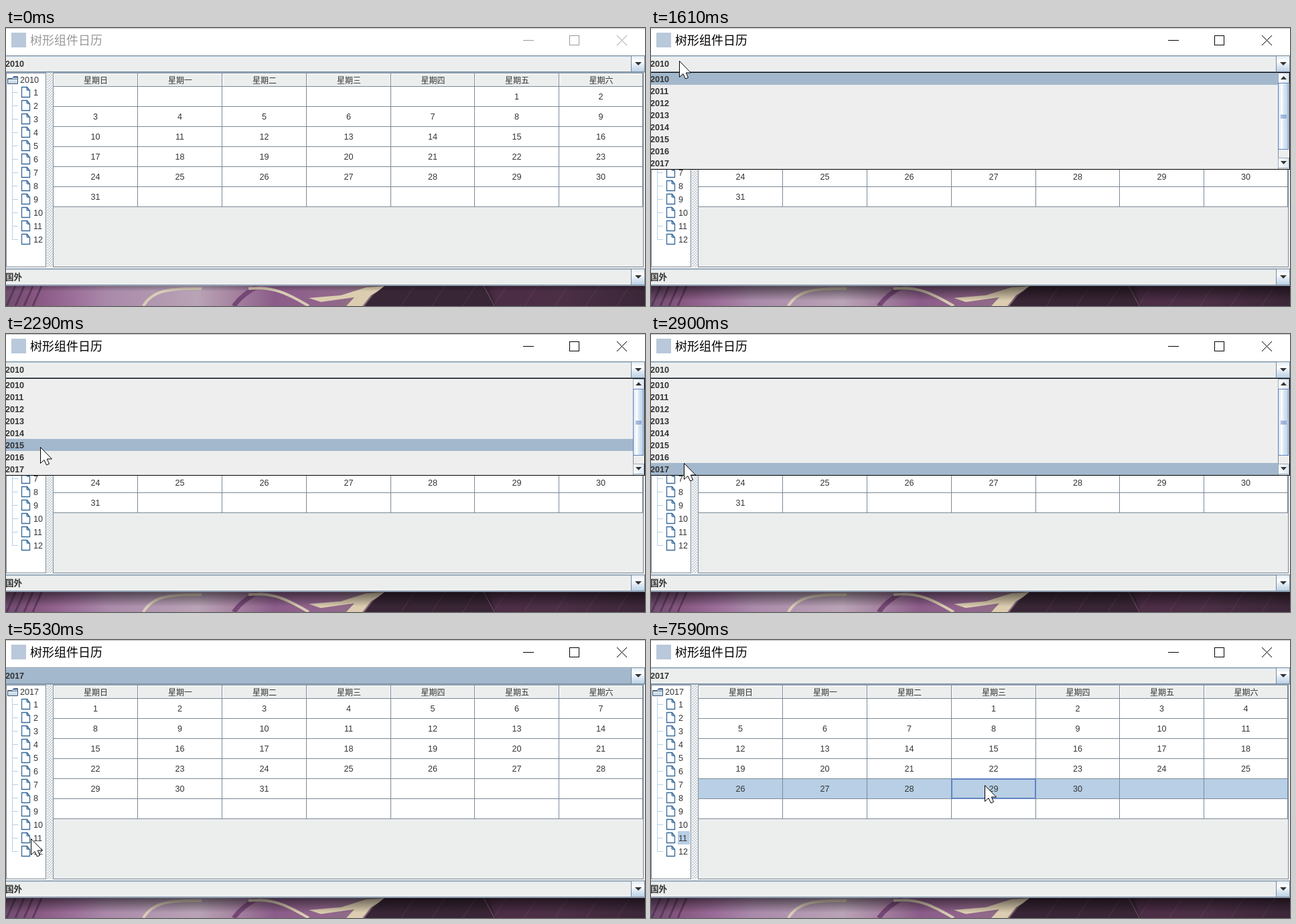
Recreate the animation shown at these times as an HTML page with a canvas. Size 954 by 416 pixels, loop 8000 ms.

```html
<!DOCTYPE html>
<html lang="zh">
<head>
<meta charset="utf-8">
<style>
html, body { margin: 0; width: 100%; height: 100%; overflow: hidden; background: #eceeee }
canvas { display: block }
</style>
</head>
<body>
<canvas width="954" height="416"></canvas>
<script>
const g = document.querySelector('canvas').getContext('2d');
const LOOP = 8000;
const EDGE = '#7a8a99', PALE = '#b8cfe5', BLUE = '#6382bf', FOCUS = '#a3b8cc', PANEL = '#eceeee', INK = '#333';
const FACE = '"Liberation Sans", "Noto Sans CJK SC", "Noto Sans CJK", sans-serif';
const PLAIN = '12.6px ' + FACE, BOLD = 'bold 12.6px ' + FACE;
const HAN = '12px "Noto Sans CJK SC", "Noto Sans CJK", sans-serif';
const COLS = [71, 197, 323, 449, 575, 700, 826, 951];

const linear = p => p, speedUp = p => p * p, slowDown = p => 1 - (1 - p) ** 2;
const smooth = p => p * p * (3 - 2 * p);

// Pointer moves: first step, last step, number of steps, target, easing
const MOVES = [
  [70, 70, 1, 678, 396, linear],
  [148, 850, 10, 44, 63, smooth],
  [900, 1130, 4, 42, 51, slowDown],
  [1300, 1300, 1, 42, 49, linear],
  [1820, 2290, 7, 51, 169, smooth],
  [2360, 2520, 3, 49, 191, slowDown],
  [2900, 3060, 3, 48, 198, linear],
  [4220, 4450, 4, 28, 119, smooth],
  [4530, 4610, 2, 24, 170, speedUp],
  [4680, 4990, 5, 37, 270, slowDown],
  [5080, 5530, 6, 37, 297, slowDown],
  [6220, 6900, 10, 309, 236, speedUp],
  [6980, 6980, 1, 361, 236, linear],
  [7050, 7440, 6, 498, 217, slowDown]
];

function pointerAt(t) {
  let x = 740, y = 430;
  for (const [from, to, n, tx, ty, ease] of MOVES) {
    if (t < from) break;
    const step = n > 1 ? Math.floor((t - from + 1) / (to - from) * (n - 1)) + 1 : 1;
    const p = ease(Math.min(step, n) / n);
    x += (tx - x) * p;
    y += (ty - y) * p;
  }
  return [Math.round(x), Math.round(y)];
}

function box(x, y, w, h, color) {
  g.fillStyle = color;
  g.fillRect(x, y, w, h);
}
function frame(x, y, w, h, color) {
  g.strokeStyle = color;
  g.lineWidth = 1;
  g.strokeRect(x + .5, y + .5, w - 1, h - 1);
}
function text(s, x, y, font = PLAIN, color = INK, align = 'left') {
  g.font = font;
  g.fillStyle = color;
  g.textAlign = align;
  g.fillText(s, x, y);
}
function shape(points, fill, stroke, width = 1) {
  g.beginPath();
  points.forEach(([x, y]) => g.lineTo(x, y));
  if (fill) { g.closePath(); g.fillStyle = fill; g.fill(); }
  if (stroke) { g.strokeStyle = stroke; g.lineWidth = width; g.stroke(); }
}
function ramp(x0, y0, x1, y1, ...stops) {
  const r = g.createLinearGradient(x0, y0, x1, y1);
  stops.forEach(([at, color]) => r.addColorStop(at, color));
  return r;
}
function curve(color, width, x, y, ...c) {
  g.beginPath();
  g.moveTo(x, y);
  g.bezierCurveTo(...c);
  g.strokeStyle = color;
  g.lineWidth = width;
  g.stroke();
}

function wallpaper(active) {
  box(0, 385, 954, 31, ramp(0, 0, 954, 0, [0, '#704d70'], [.04, '#85557f'], [.1, '#9a6c98'],
    [.16, '#aa8aaa'], [.3, '#b9a3b6'], [.36, '#a582a0'], [.42, '#8b5c89'], [.5, '#92668d'],
    [.56, '#8d6f83'], [.6, '#3d2939'], [.74, '#382434'], [.77, '#4c2d46'], [.87, '#4b2f45'], [1, '#3b2638']));
  for (let x = 4; x < 50; x += 13) curve('#43294699', 3, x + 10, 386, x + 6, 396, x + 3, 402, x - 3, 416);
  curve('#d9cdb8', 4, 205, 416, 218, 394, 240, 389, 292, 390);
  curve('#754775', 7, 340, 416, 352, 400, 362, 395, 376, 386);
  curve('#d8cbb2', 4, 362, 390, 398, 386, 420, 397, 452, 416);
  shape([[452, 404], [500, 400], [538, 388], [568, 386], [545, 400], [532, 416], [508, 416], [520, 403], [470, 410]], '#dccdb0');
  shape([[565, 386], [720, 386], [731, 416], [535, 416], [548, 400]], '#382535');
  for (let x = 590; x < 954; x += 46) curve('#8b65784d', 1, x + 20, 386, x + 13, 395, x + 6, 406, x, 416);
  curve('#80576d', 1, 713, 386, 718, 395, 724, 406, 729, 416);
  const depth = active ? 22 : 8;
  box(0, 386, 954, depth, ramp(0, 386, 0, 386 + depth, [0, active ? '#0008' : '#0004'], [1, '#0000']));
}

function titleBar(active) {
  const color = active ? '#000' : '#999';
  box(0, 0, 954, 41, '#fff');
  box(0, 0, 954, 1, '#bfbfbf');
  box(8, 7, 22, 22, '#b9c8da');
  text('树形组件日历', 36, 25, '18px "Noto Sans CJK SC", "Noto Sans CJK", sans-serif', color);
  box(772, 18, 16, 1, color);
  frame(841, 11, 15, 15, color);
  shape([[912, 11], [927, 26]], null, color);
  shape([[927, 11], [912, 26]], null, color);
}

function combo(y, value, focused) {
  box(0, y, 954, 26, PANEL);
  box(0, y, 954, 1, EDGE);
  box(0, y + 1, 954, 1, PALE);
  if (focused) box(0, y + 2, 933, 22, FOCUS);
  box(0, y + 24, 954, 1, EDGE);
  box(0, y + 25, 954, 1, '#9cb0c5');
  box(934, y + 1, 20, 24, ramp(0, y, 0, y + 25, [0, '#dde8f3'], [.35, '#fff'], [.55, '#e4edf6'], [1, PALE]));
  frame(933, y, 21, 25, EDGE);
  shape([[939, y + 10], [949, y + 10], [944, y + 15]], INK);
  text(value, -1, y + 17, BOLD);
}

function tree(year, selected, focused) {
  box(0, 67, 60, 292, '#fff');
  frame(0, 67, 60, 291, EDGE);
  box(9, 86, 1, 231, PALE);
  shape([[2.5, 83.5], [2.5, 75.5], [9.5, 75.5], [11.5, 72.5], [17.5, 72.5], [17.5, 83.5], [2.5, 83.5]],
    ramp(0, 72, 0, 84, [0, '#fff'], [1, '#b9cde0']), '#40586f');
  box(10, 73, 7, 2, BLUE);
  box(3, 76, 14, 1, '#667d91');
  text(year, 21, 82);
  for (let i = 0; i < 12; i++) {
    const y = 86 + 20 * i;
    box(9, y + 10, 9, 1, PALE);
    shape([[23.5, y + 2.5], [31.5, y + 2.5], [35.5, y + 7.5], [35.5, y + 17.5], [23.5, y + 17.5], [23.5, y + 2]],
      '#fff', '#36699a', 1.3);
    shape([[31, y + 3], [31, y + 7], [35, y + 7.5]], '#9fbdda', '#36699a');
    if (selected === i + 1) {
      box(40, y, 18, 20, PALE);
      if (focused) frame(40, y, 18, 20, BLUE);
    }
    text(i + 1, 41, y + 15);
  }
}

function divider() {
  box(60, 67, 10, 292, PANEL);
  for (let y = 68; y < 357; y += 2)
    for (let x = 62 + y % 4; x < 69; x += 4) {
      box(x, y, 1, 1, '#879caf');
      box(x + 1, y + 1, 1, 1, '#fff');
    }
}

function table(year, month, pickedRow, pickedCol) {
  box(70, 67, 884, 292, PANEL);
  box(71, 88, 880, 180, '#fff');
  if (pickedRow >= 0) box(71, 88 + 30 * pickedRow, 880, 29, PALE);
  const first = new Date(year, month - 1, 1).getDay();
  const days = new Date(year, month, 0).getDate();
  for (let c = 0; c < 7; c++) {
    const x = COLS[c], end = COLS[c + 1], mid = (x + end - 1) / 2;
    box(x, 68, end - x, 1, '#fff');
    box(x, 68, 1, 19, '#fff');
    text('星期' + '日一二三四五六'[c], mid + .5, 83, HAN, INK, 'center');
    box(end - 1, 68, 1, 200, EDGE);
    for (let r = 0; r < 6; r++) {
      const day = r * 7 + c - first + 1;
      if (day > 0 && day <= days) text(day, mid, 107 + 30 * r, PLAIN, INK, 'center');
    }
  }
  for (let y = 87; y <= 267; y += 30) box(71, y, 880, 1, EDGE);
  if (pickedRow >= 0) {
    const x = COLS[pickedCol];
    frame(x - 1, 87 + 30 * pickedRow, COLS[pickedCol + 1] - x + 1, 31, BLUE);
    frame(x, 88 + 30 * pickedRow, COLS[pickedCol + 1] - x - 1, 29, BLUE);
  }
  frame(70, 67, 882, 291, EDGE);
}

function scrollButton(y, up) {
  box(937, y, 15, 15, ramp(937, 0, 952, 0, [0, '#fff'], [1, '#dce6f0']));
  frame(936, y, 17, 16, '#9aabbc');
  const tip = up ? y + 5 : y + 10, base = up ? y + 10 : y + 5;
  shape([[940, base], [949, base], [944.5, tip]], INK);
}

function popup(hover) {
  box(0, 66, 954, 146, '#000');
  box(0, 67, 953, 144, '#eee');
  box(0, 67 + 18 * hover, 936, 18, FOCUS);
  for (let i = 0; i < 8; i++) text(2010 + i, -1, 81 + 18 * i, BOLD);
  box(936, 67, 1, 144, EDGE);
  scrollButton(67, true);
  scrollButton(194, false);
  box(937, 82, 15, 100, ramp(937, 0, 952, 0, [0, '#d3e2ef'], [.3, '#fff'], [.5, '#dce8f3'], [1, PALE]));
  frame(936, 82, 16, 100, BLUE);
  for (let y = 130; y < 136; y += 2) box(940, y, 9, 1, BLUE);
}

function pointer(x, y) {
  const outline = [[0, 0], [0, 24], [5.5, 19], [9, 26.5], [13, 24.8], [9.8, 17.5], [17, 17.5]];
  shape([...outline, [0, 0]].map(([a, b]) => [x + a + .5, y + b + .5]), '#fff', '#000');
}

function draw(t) {
  const active = t >= 1530, open = t >= 1610 && t < 3590;
  const year = t < 3590 ? 2010 : 2017, november = t >= 5760, picked = t >= 7590;
  const [x, y] = pointerAt(t);
  wallpaper(active);
  titleBar(active);
  box(0, 41, 954, 345, PANEL);
  combo(41, year, t >= 3590 && !november);
  tree(year, november ? 11 : 0, !picked);
  divider();
  table(year, november ? 11 : 1, picked ? 4 : -1, 3);
  combo(360, '国外', false);
  if (open) popup(Math.max(0, Math.min(7, Math.floor((y - 67) / 18))));
  if (t >= 70) pointer(x, y);
}

function tick(now) {
  draw(now % LOOP);
  requestAnimationFrame(tick);
}
requestAnimationFrame(tick);
</script>
</body>
</html>
```
